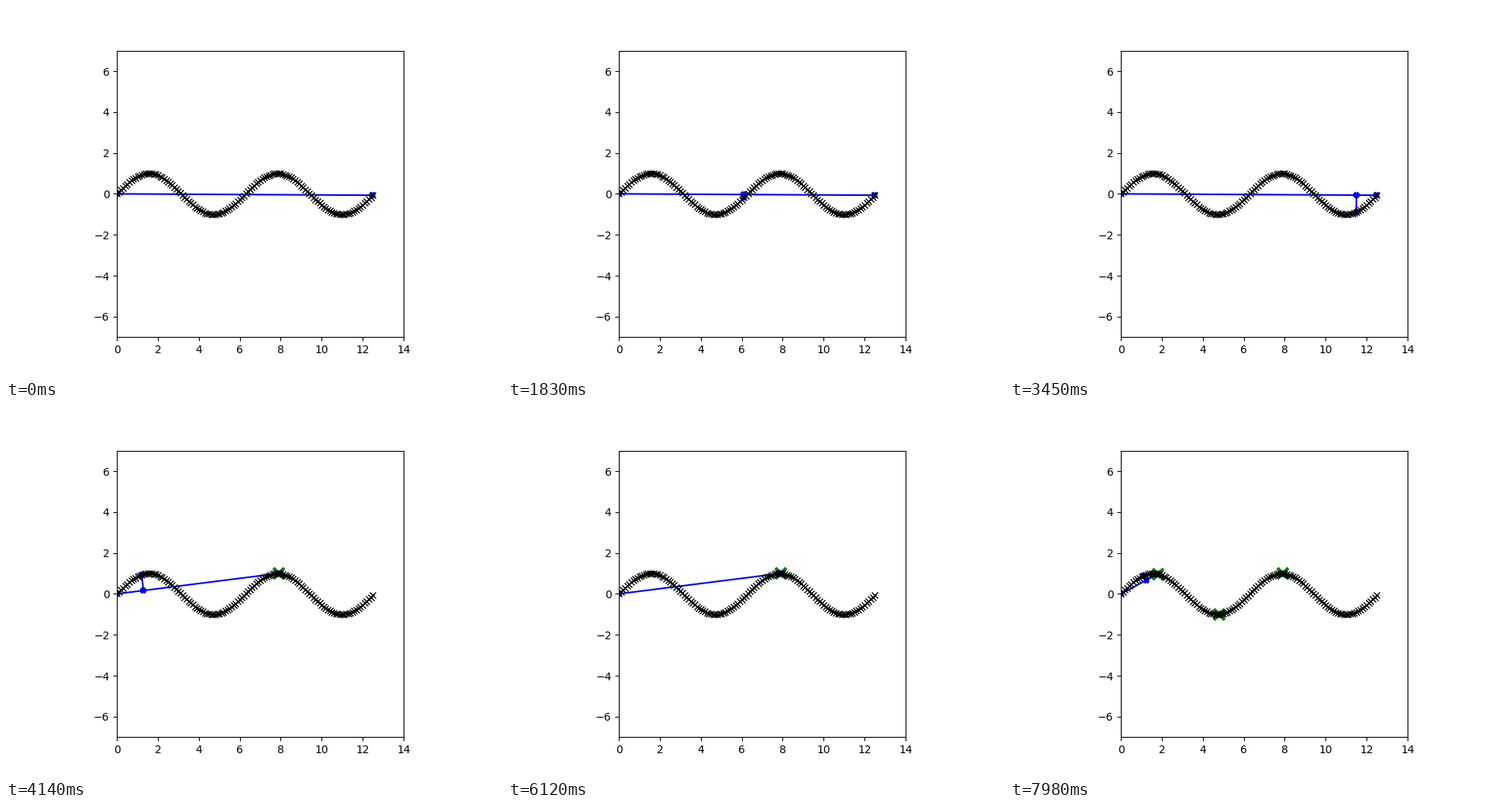
Write a matplotlib script that moves like this. It is 640 by 480 pixels and loops after 8 s.

```python
import numpy as np
import matplotlib.pyplot as plt
from matplotlib.animation import FuncAnimation

LOOP_MS = 8000
FRAMES = 267

# Line simplification: scan a chord, split at the farthest point, go left.
xs = np.arange(0, 4 * np.pi, 0.1)
pts = np.column_stack([xs, np.sin(xs)])


def foot(p, a, b):
    """Foot of the perpendicular from p to the line through a and b."""
    d = b - a
    return a + d * np.dot(p - a, d) / np.dot(d, d)


def farthest(end):
    a, b = pts[0], pts[end]
    dist = [np.hypot(*(p - foot(p, a, b))) for p in pts[:end + 1]]
    return int(np.argmax(dist))


def plan_steps(count):
    """One (chord end, scanned index, split points) entry per frame."""
    steps, end, splits = [], len(pts) - 1, []
    while len(steps) < count:
        steps += [(end, i, list(splits)) for i in range(end + 1)]
        end = farthest(end)
        splits.append(end)
    return steps[:count]


steps = plan_steps(FRAMES)

fig, ax = plt.subplots(figsize=(6.4, 4.8), dpi=100)
ax.set_aspect("equal")
ax.set_xlim(0, 14)
ax.set_ylim(-7, 7)

kept, = ax.plot([], [], "gx", ms=10, mew=3)
chord, = ax.plot([], [], "bx-", ms=5, mew=3)
drop, = ax.plot([], [], "bx-", ms=5, mew=3)
ax.plot(*pts.T, "kx")


def update(frame):
    end, i, splits = steps[frame]
    a, b, p = pts[0], pts[end], pts[i]
    chord.set_data(*np.array([a, b]).T)
    drop.set_data(*np.array([p, foot(p, a, b)]).T)
    kept.set_data(pts[splits, 0] if splits else [],
                  pts[splits, 1] if splits else [])
    return kept, chord, drop


anim = FuncAnimation(fig, update, frames=FRAMES, interval=LOOP_MS / FRAMES,
                     init_func=lambda: update(0), repeat=True, repeat_delay=0)
plt.show()
```
